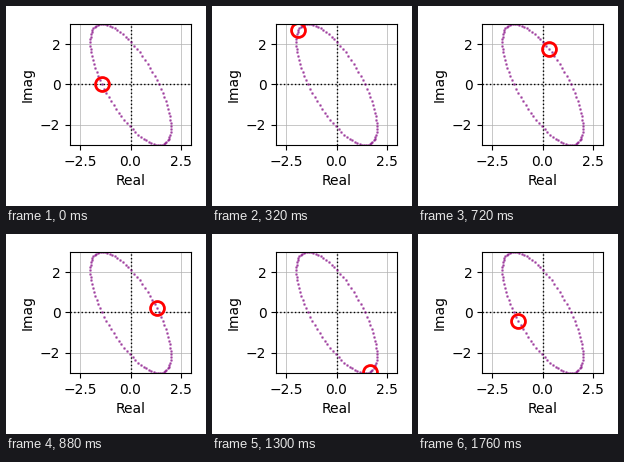
A matplotlib script that plays this animation: 200 px wide and 200 px high, repeating every 1780 ms.

```python
import numpy as np
import matplotlib.pyplot as plt
from matplotlib.animation import FuncAnimation

SIZE, DPI = 200, 100
STEPS = 90      # samples around the closed curve
FRAMES = 89     # the loop stops one sample short
INTERVAL = 20


def orbit(step):
    """Point on the tilted ellipse after a number of equal phase steps."""
    t = 2 * np.pi * step / STEPS
    return -2 * np.cos(t - np.pi / 4), 3 * np.sin(t)


fig = plt.figure(figsize=(SIZE / DPI, SIZE / DPI), dpi=DPI, facecolor="white")
left, bottom, side = 64.1, 61.15, 120.9
ax = fig.add_axes([left / SIZE, bottom / SIZE, side / SIZE, side / SIZE])
ax.set(xlim=(-3, 3), ylim=(-3, 3), xlabel="Real", ylabel="Imag",
       xticks=[-2.5, 0, 2.5], yticks=[-2, 0, 2])
ax.grid(True, lw=0.5)
ax.axhline(0, color="black", ls=":", lw=1)
ax.axvline(0, color="black", ls=":", lw=1)

ax.plot(*orbit(np.arange(STEPS)), ".", color="purple", ms=2, alpha=0.5)
ring, = ax.plot([], [], "o", mfc="none", mec="red", ms=10, mew=2)


def update(frame):
    x, y = orbit(frame)
    ring.set_data([x], [y])
    return ring,


anim = FuncAnimation(fig, update, frames=FRAMES, interval=INTERVAL,
                     repeat=True, repeat_delay=0, blit=False)
plt.show()
```
